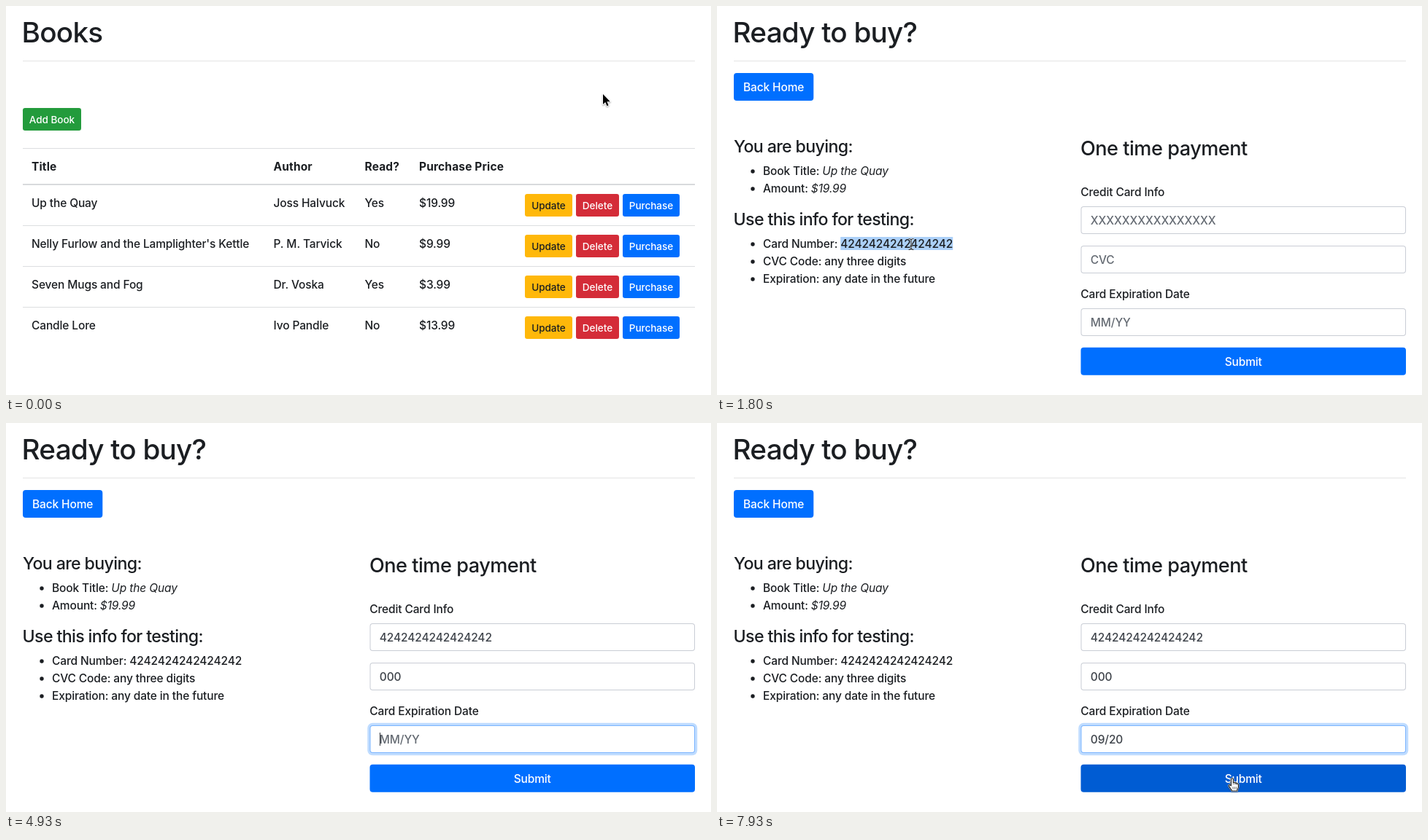
These frames come from a looping animation (966x534 px, 8 s). An HTML page with a canvas:

```html
<!DOCTYPE html>
<html lang="en">
<head>
<meta charset="utf-8">
<title>Book shop checkout</title>
<style>
html, body { margin: 0; width: 100%; height: 100%; overflow: hidden; background: #fff; }
canvas { display: block; width: 966px; height: 534px; }
</style>
</head>
<body>
<canvas id="stage" width="966" height="534"></canvas>
<script>
const ctx = document.getElementById('stage').getContext('2d');
const LOOP = 8000, PAGE_SWAP = 830, BLINK = 530;
const FAMILY = 'Inter, "Open Sans", sans-serif';
const INK = '#1b1e22', BLUE = [0, 111, 255], BLUE_DARK = [0, 92, 211];
const FORM_X = 498.5, FORM_W = 445.5, FIELD_H = 38, SUBMIT_Y = 468.7;

// weight/style, size, tracking
const FONT = {
  h1: ['500', 38.7, -0.78],
  h3: ['500', 27.1, -0.48],
  h4: ['500', 23.2, -0.65],
  body: ['450', 15.5, -0.13],
  italic: ['italic 450', 15.5, -0.13],
  bold: ['700', 15.5, 0.15],
  small: ['450', 13.55, -0.05]
};

const books = [
  ['Up the Quay', 'Joss Halvuck', 'Yes', '$19.99'],
  ["Nelly Furlow and the Lamplighter's Kettle", 'P. M. Tarvick', 'No', '$9.99'],
  ['Seven Mugs and Fog', 'Dr. Voska', 'Yes', '$3.99'],
  ['Candle Lore', 'Ivo Pandle', 'No', '$13.99']
];
const columns = [35, 366.5, 491.5, 566];
const CARD = '4242424242424242';

const fields = [
  { y: 275, hint: 'XXXXXXXXXXXXXXXX', text: CARD, keys: [2800], from: 2670, to: 3330 },
  { y: 329, hint: 'CVC', text: '000', keys: [4000, 4200, 4470], from: 3330, to: 4730 },
  { y: 415, hint: 'MM/YY', text: '09/20', keys: [5000, 5200, 5670, 6000, 6200], from: 4730, to: 9000 }
];
const caretResets = [2670, 3270, 4730, ...fields.flatMap(f => f.keys)].sort((a, b) => a - b);

// time, x, y of the pointer's hot spot
const route = [
  [70, 818, 121], [470, 892, 275], [530, 889, 283],
  [1150, 889, 283], [1330, 266, 327],
  [2010, 266, 327], [2530, 578, 298],
  [2950, 578, 298], [3200, 547, 351],
  [7150, 547, 351], [7600, 684, 510], [7730, 699, 503], [7930, 706, 488]
];
const hiddenSpans = [[2800, 3000], [4000, 7200]];

const clamp = v => Math.max(0, Math.min(1, v));
const mix = (a, b, k) => `rgb(${a.map((v, i) => Math.round(v + (b[i] - v) * k))})`;
const inside = (p, x, y, w, h) => p.x >= x && p.x <= x + w && p.y >= y && p.y <= y + h;

function pointer(t) {
  let a = route[0];
  for (const b of route) {
    if (t < b[0]) {
      const k = clamp((t - a[0]) / (b[0] - a[0] || 1));
      const e = k * k * (3 - 2 * k);
      return { x: a[1] + (b[1] - a[1]) * e, y: a[2] + (b[2] - a[2]) * e };
    }
    a = b;
  }
  return { x: a[1], y: a[2] };
}

// 150 ms linear hover fade, as the mean of recent hits
function hoverBlue(t, x, y, w, h) {
  let hits = 0;
  for (let i = 0; i < 15; i++) hits += inside(pointer(t - i * 10), x, y, w, h);
  return mix(BLUE, BLUE_DARK, hits / 15);
}

function setFont(kind) {
  const [style, size, gap] = FONT[kind];
  ctx.font = `${style} ${size}px ${FAMILY}`;
  ctx.letterSpacing = gap + 'px';
}

function text(str, x, y, kind = 'body', color = INK) {
  setFont(kind);
  ctx.fillStyle = color;
  ctx.fillText(str, x, y);
  return x + ctx.measureText(str).width;
}

function centered(str, x, y, kind, color) {
  setFont(kind);
  const gap = FONT[kind][2];
  text(str, x - (ctx.measureText(str).width - gap) / 2, y, kind, color);
}

function rect(x, y, w, h, color) {
  ctx.fillStyle = color;
  ctx.fillRect(x, y, w, h);
}

function round(x, y, w, h, r, color) {
  ctx.fillStyle = color;
  ctx.beginPath();
  ctx.roundRect(x, y, w, h, r);
  ctx.fill();
}

function button(label, x, y, w, h, color, kind = 'small', ink = '#fff') {
  const small = kind === 'small';
  round(x, y, w, h, small ? 3.2 : 4, color);
  centered(label, x + w / 2, Math.round(y + h / 2 + (small ? 5 : 6)), kind, ink);
}

function heading(str) {
  text(str, 21.6, 50, 'h1');
  rect(23, 75, 921, 1, '#e4e4e4');
}

function listPage(t) {
  const p = pointer(t);
  heading('Books');
  button('Add Book', 23, 140, 80, 31, '#239b3c');
  rect(23, 195, 921, 1, '#dcdee0');
  ['Title', 'Author', 'Read?', 'Purchase Price'].forEach((s, i) => text(s, columns[i], 226, 'bold'));
  books.forEach((book, i) => {
    const top = 246 + i * 56;
    if (inside(p, 23, top, 921, 55)) rect(23, top, 921, 55, '#e8e8e8');
    book.forEach((s, c) => text(s, columns[c], top + 30));
    const y = top + 12;
    button('Update', 711, y, 65, 31, '#ffb80a', 'small', INK);
    button('Delete', 781, y, 59, 31, '#d42c38');
    button('Purchase', 845, y, 78, 31, hoverBlue(t, 845, y, 78, 31));
    if (i) rect(23, top - 1, 921, 1, '#dcdee0');
  });
  rect(23, 244, 921, 2, '#d8dadd');
}

function bullet(y, label, value = '', kind = 'body') {
  ctx.fillStyle = INK;
  ctx.beginPath();
  ctx.arc(49, y - 5, 2.7, 0, Math.PI * 2);
  ctx.fill();
  text(value, text(label, 63, y), y, kind);
}

function drawField(f, t) {
  const fade = from => clamp((t - from + 60) / 150);
  const lit = t < f.to ? (t >= f.from ? fade(f.from) : 0) : 1 - fade(f.to);
  if (lit > 0) round(FORM_X - 3.2, f.y - 3.2, FORM_W + 6.4, FIELD_H + 6.4, 7, `rgba(0,115,255,${0.25 * lit})`);
  round(FORM_X, f.y, FORM_W, FIELD_H, 4, mix([201, 205, 213], [122, 180, 255], lit));
  round(FORM_X + 1, f.y + 1, FORM_W - 2, FIELD_H - 2, 3, '#fff');

  const count = f.keys.filter(k => t >= k).length;
  const pasted = f.keys.length === 1;
  const typed = f.text.slice(0, pasted ? count * f.text.length : count);
  const base = f.y + 25;
  let end = 512;
  if (typed) end = text(typed, 511.8, base, 'body', '#3e434a');
  else text(f.hint, 511.8, base, 'body', '#656b73');

  if (t >= f.from && t < f.to) {
    const last = caretResets.filter(k => k <= t).pop();
    if (Math.floor((t - last) / BLINK) % 2 === 0) rect(Math.round(end), f.y + 10, 1, 18, '#30343a');
  }
}

function payPage(t) {
  heading('Ready to buy?');
  button('Back Home', 23, 92, 109.3, 38, mix(BLUE, BLUE, 0), 'body');

  text('You are buying:', 23, 201, 'h4');
  bullet(232, 'Book Title: ', books[0][0], 'italic');
  bullet(256, 'Amount: ', books[0][3], 'italic');

  text('Use this info for testing:', 22.6, 301, 'h4');
  if (t >= 1800 && t < 2670) {
    setFont('body');
    const x = 63 + ctx.measureText('Card Number: ').width;
    rect(x, 317, ctx.measureText(CARD).width, 18, '#acd0f8');
  }
  bullet(332, 'Card Number: ', CARD);
  bullet(356, 'CVC Code: any three digits');
  bullet(380, 'Expiration: any date in the future');

  text('One time payment', 498, 204.5, 'h3');
  text('Credit Card Info', 498.3, 261);
  text('Card Expiration Date', 498.3, 401);
  fields.forEach(f => drawField(f, t));
  const submit = [FORM_X, SUBMIT_Y, FORM_W, FIELD_H];
  button('Submit', ...submit, hoverBlue(t, ...submit), 'body');
}

const ARROW = new Path2D('M0 0V14L3.2 11.1L5.5 16.2L7.6 15.3L5.4 10.3H9.8Z');
const HAND = new Path2D('M-1.6 10V1.2Q-1.5 -.2 -.1 -.2Q1.3 -.2 1.3 1.2V5.6Q2.6 4.8 3.8 6.1' +
  'Q5.3 5.4 6.2 6.9Q8.3 6.4 8.4 8.6V11.5Q8.2 13.6 6.9 15V17H-.6Q-1 15.4 -2.6 13.6L-4.7 10.4Q-4.9 8.4 -3.2 8.6Z');
const CREASES = new Path2D('M1.3 5.6V8.4M3.9 6.2V8.6M6.2 7V9M1 11.4V14.6M3.2 11.4V14.6M5.4 11.4V14.6');
const BEAM = new Path2D('M-3.5 -7.5Q-.5 -7.5 0 -6Q.5 -7.5 3.5 -7.5M0 -6V6M-3.5 7.5Q-.5 7.5 0 6Q.5 7.5 3.5 7.5M-1.8 2.5H1.8');

function cursorKind(p, t) {
  if (t < PAGE_SWAP) {
    return books.some((_, i) => inside(p, 711, 258 + i * 56, 212, 31)) ? 'hand' : 'arrow';
  }
  if (inside(p, FORM_X, SUBMIT_Y, FORM_W, FIELD_H)) return 'hand';
  const overText = inside(p, 63, 316, 260, 20) || fields.some(f => inside(p, FORM_X, f.y, FORM_W, FIELD_H));
  return overText ? 'beam' : 'arrow';
}

function stroke(path, color, width) {
  ctx.strokeStyle = color;
  ctx.lineWidth = width;
  ctx.stroke(path);
}

function drawCursor(t) {
  if (hiddenSpans.some(([a, b]) => t >= a && t < b)) return;
  const p = pointer(t), kind = cursorKind(p, t);
  ctx.save();
  ctx.translate(p.x, p.y);
  ctx.lineJoin = 'round';
  if (kind === 'beam') {
    stroke(BEAM, 'rgba(255,255,255,.6)', 2.4);
    stroke(BEAM, '#26282b', 1.1);
  } else {
    const path = kind === 'hand' ? HAND : ARROW;
    ctx.save();
    ctx.shadowColor = 'rgba(0,0,0,.35)';
    ctx.shadowBlur = 2;
    ctx.shadowOffsetY = 1;
    stroke(path, '#fff', 2);
    ctx.restore();
    ctx.fillStyle = kind === 'hand' ? '#fff' : '#000';
    ctx.fill(path);
    if (kind === 'hand') {
      stroke(path, '#111', 1.1);
      stroke(CREASES, '#333', 0.7);
    }
  }
  ctx.restore();
}

function draw(now) {
  // the screen updates at 15 steps per second
  const step = Math.floor(((now % LOOP) + 5) * 15 / 1000) % 120;
  const t = Math.round(step * 100 / 15) * 10;
  rect(0, 0, 966, 534, '#fff');
  (t < PAGE_SWAP ? listPage : payPage)(t);
  drawCursor(t);
}

let start;
function frame(now) {
  start ??= now;
  draw(now - start);
  requestAnimationFrame(frame);
}
requestAnimationFrame(frame);
</script>
</body>
</html>
```
